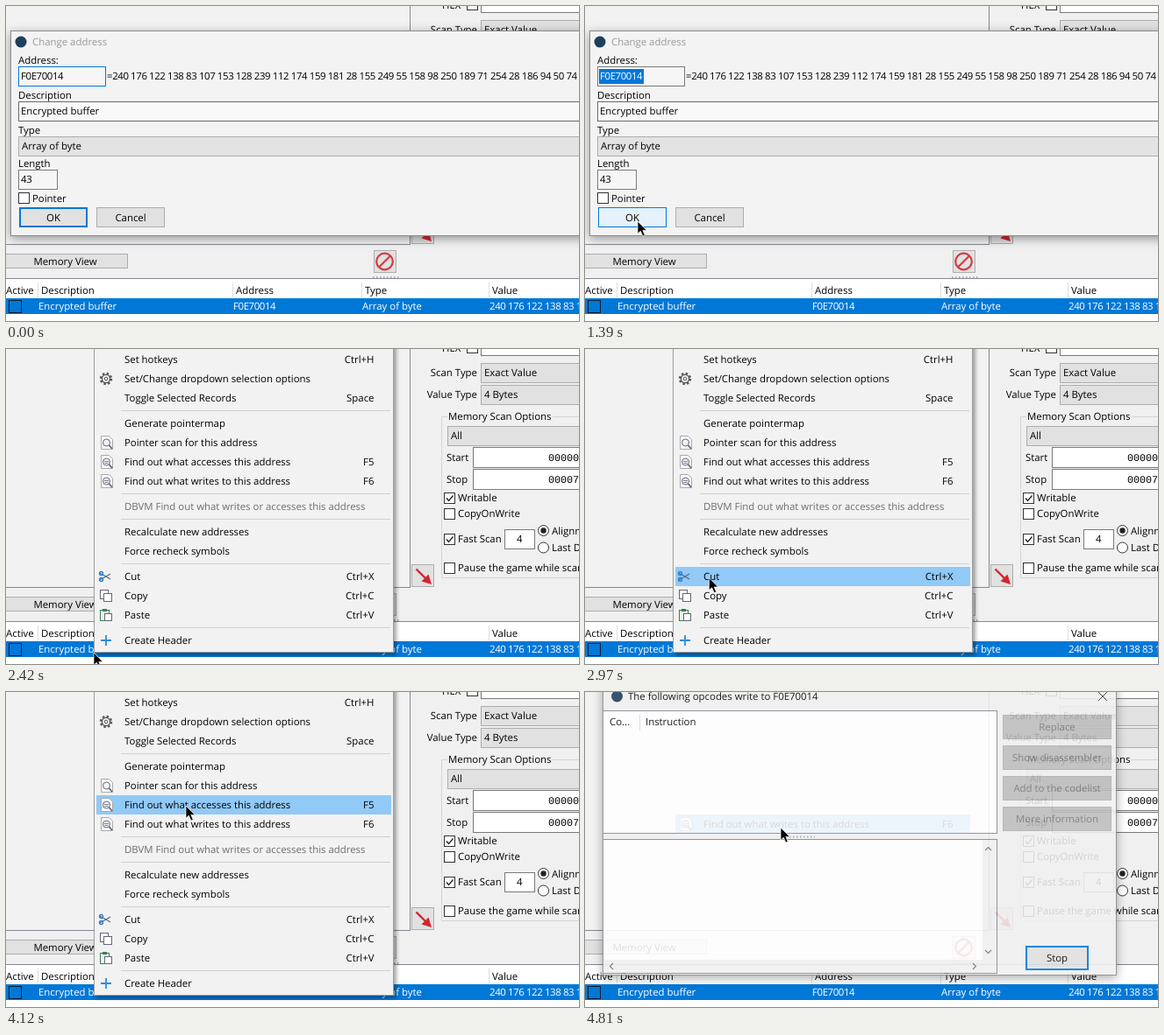
Animation, 653 px wide and 360 px high, one loop 4.89 s. Source, as an HTML page:

```html
<!DOCTYPE html>
<html lang="en">
<head>
<meta charset="utf-8">
<title>Change address</title>
<style>
html, body { margin: 0; width: 100%; height: 100%; overflow: hidden; background: #f0f0f0; }
svg { display: block; width: 653px; height: 360px; }
text { font: 11.4px "Open Sans", "Noto Sans", sans-serif; text-rendering: geometricPrecision; white-space: pre; }
.num { letter-spacing: -.38px; }
.mono { font: 11.7px "Liberation Mono", monospace; }
.shadow { filter: drop-shadow(0 3px 6px rgba(0, 0, 0, .38)); }
.soft { filter: drop-shadow(3px 3px 2px rgba(0, 0, 0, .35)); }
</style>
</head>
<body>
<svg id="stage" viewBox="0 0 653 360"></svg>
<script>
const LOOP = 4890, STEP = 75;
const BLUE = '#0078d7', FACE = '#e1e1e1', EDGE = '#adadad', FIELD = '#7a7a7a', HOT = '#91c9f7';
const stage = document.getElementById('stage');
const ui = {};
let layer = stage;

function add(tag, attrs) {
  const el = document.createElementNS('http://www.w3.org/2000/svg', tag);
  for (const k in attrs) el.setAttribute(k, attrs[k]);
  layer.appendChild(el);
  return el;
}

function group(build, attrs) {
  const parent = layer, g = add('g', attrs);
  layer = g;
  build();
  layer = parent;
  return g;
}

// Boxes with an outline sit on half pixels to stay crisp.
function box(x, y, w, h, fill, stroke, cls = '') {
  if (!stroke) return add('rect', { x, y, width: w, height: h, fill });
  return add('rect', { x: x + .5, y: y + .5, width: w - 1, height: h - 1, fill, stroke, class: cls });
}

// y is the middle of the capitals.
function label(s, x, y, { fill = '#000', anchor = 'start', cls = '' } = {}) {
  const el = add('text', { x, y: y + 4, fill, 'text-anchor': anchor, class: cls });
  el.textContent = s;
  return el;
}

const path = (d, stroke, width = 1, fill = 'none') =>
  add('path', { d, stroke, 'stroke-width': width, fill });
const disc = (cx, cy, r, fill, stroke = 'none', width = 1) =>
  add('circle', { cx, cy, r, fill, stroke, 'stroke-width': width });

function dots(x, y, w) {
  add('path', { d: `M${x} ${y}h${w}`, stroke: '#999', 'stroke-width': 1.5, 'stroke-dasharray': '1.5 2.5' });
}

function check(x, y, on) {
  box(x, y, 13, 13, '#fff', '#333');
  if (on) path(`M${x + 3} ${y + 6.5}l2.5 3l5 -6`, '#222', 1.3);
}

function radio(s, x, y, on) {
  disc(x, y, 6, '#fff', '#333');
  if (on) disc(x, y, 3.2, '#222');
  label(s, x + 9.5, y);
}

function button(s, x, y, w, h, { face = FACE, edge = EDGE, ink = '#000' } = {}) {
  const el = box(x, y, w, h, face, edge);
  label(s, x + w / 2, y + h / 2, { fill: ink, anchor: 'middle' });
  return el;
}

// Second outline of the default button.
const ring = (x, y, w, h) => box(x + 1, y + 1, w - 2, h - 2, 'none', BLUE);

function combo(s, x, y, face = FACE) {
  box(x, y - 11, 900, 23, face, EDGE);
  label(s, x + 4, y);
}

const bytes = '240 176 122 138 83 107 153 128 239 112 174 159 181 28 155 249 55 158 98 250 189 71 254 28 186 94 50 74 12';

// Main window
group(() => {
  box(0, 0, 653, 360, '#f0f0f0');
  box(-2, -2, 463, 275, '#f2f2f2', '#828790');

  label('HEX', 497, -1);
  check(525, -8);
  box(541, -16, 130, 24, '#fff', FIELD);
  ['Scan Type', 'Value Type'].forEach((s, i) => {
    label(s, 537, 27 + 25 * i, { anchor: 'end' });
    combo(['Exact Value', '4 Bytes'][i], 541, 27 + 25 * i);
  });
  path('M503 77.5H496.5V261.5H660M623 77.5H660', '#d5d5d5');
  label('Memory Scan Options', 504, 77);
  combo('All', 503, 99);
  ['Start', 'Stop'].forEach((s, i) => {
    const y = 124 + 25 * i;
    label(s, 502, y, { anchor: 'start' });
    box(532, y - 12, 150, 24, '#fff', FIELD);
    label(i ? '00007fff' : '00000000', 618, y, { cls: 'mono' });
  });
  [['Writable', 170, 1], ['CopyOnWrite', 188, 0], ['Fast Scan', 217, 1],
   ['Pause the game while scanning', 250, 0]].forEach(([s, y, on]) => {
    check(499, y - 6, on);
    label(s, 515, y);
  });
  box(568, 206, 35, 23, '#fff', FIELD);
  label('4', 582, 217);
  radio('Alignment', 612.5, 207.5, true);
  radio('Last Digits', 612.5, 227, false);

  box(462, 246, 26, 26, FACE, EDGE);
  path('M467.5 251.5L478 262', '#d3262f', 2.4);
  path('M485 269L481.5 257.5L473.5 265.5Z', 'none', 0, '#d3262f');
  box(419, 279, 26, 26, FACE, EDGE);
  disc(431.5, 292, 9.3, 'none', '#d63a42', 2.2);
  path('M425 298.5L438 285.5', '#d63a42', 2.2);
  button('Memory View', -4, 283, 143, 17);
  dots(418, 310, 30);

  box(-2, 311, 660, 60, '#fff', '#828790');
  box(0, 334, 653, 18, BLUE);
  box(3, 336, 15, 15, BLUE, '#0a1a2c');
  [['Active', 0, ''], ['Description', 40, 'Encrypted buffer'], ['Address', 262, 'F0E70014'],
   ['Type', 409, 'Array of byte'], ['Value', 554, bytes]].forEach(([head, x, cell]) => {
    path(`M${x - 3.5} 316V333`, '#ddd');
    label(head, x, 325);
    label(cell, x - 3, 343, { fill: '#fff', cls: /\d/.test(cell) ? 'num' : '' });
  });
});

// Address dialog
const dialog = group(() => {
  box(5, 28, 901, 235, '#f3f3f3', '#8a8a8a', 'shadow');
  disc(17, 41, 6.5, '#1d3f5c');
  label('Change address', 30, 41, { fill: '#999' });
  label('Address:', 14, 62);
  ui.addr = box(14, 69, 100, 23, '#f6f6f6', FIELD);
  ui.sel = box(16, 72, 51, 17, BLUE);
  ui.addrText = label('F0E70014', 17, 80, { cls: 'num' });
  label('=' + bytes, 115, 80, { cls: 'num' });
  label('Description', 14, 102);
  ui.desc = box(14, 109, 880, 23, '#f9f9f9', FIELD);
  label('Encrypted buffer', 17, 120);
  label('Type', 14, 142);
  combo('Array of byte', 14, 160.5 - .5, '#e3e3e3');
  label('Length', 14, 180);
  box(14, 187, 45, 23, '#f6f6f6', FIELD);
  label('43', 17, 198, { cls: 'num' });
  check(14, 213);
  label('Pointer', 30, 220);
  ui.ok = button('OK', 15, 230, 78, 23, { edge: BLUE });
  ui.okRing = ring(15, 230, 78, 23);
  button('Cancel', 103, 230, 78, 23);
}, { style: 'transform-origin:456px 130px' });

// Context menu
const icons = {
  gear(y) {
    add('circle', { cx: 114, cy: y, r: 6, fill: 'none', stroke: '#555', 'stroke-width': 2.4, 'stroke-dasharray': '2.4 2.3' });
    disc(114, y, 4.6, '#f2f2f2', '#555', 1.4);
    disc(114, y, 1.8, 'none', '#555');
  },
  find(y) {
    path(`M108.5 ${y - 7.5}h9l4 4v11h-13z`, '#aaa', 1, '#fafafa');
    disc(114.5, y, 4, '#eef3f7', '#667');
    path(`M117.5 ${y + 3}l3.5 4`, '#667', 1.8);
  },
  asm(y) {
    icons.find(y);
    path(`M112 ${y - .5}h5M112.5 ${y + 1.5}h4`, '#778', .9);
  },
  cut(y) {
    path(`M107 ${y + 4}L119 ${y - 3}M107 ${y - 4}L119 ${y + 3}`, '#5a6b7c', 1.3);
    [-3.5, 3.5].forEach(d => disc(108.5, y + d, 2, 'none', '#2b7fd0', 1.3));
  },
  copy(y) {
    box(107, y - 7, 10, 11, '#fff', '#667');
    box(111, y - 3, 10, 10, '#fff', '#667');
  },
  paste(y) {
    box(107, y - 6, 11, 13, '#e8f0ea', '#3f7d57');
    box(110, y - 7, 5, 3, '#3f7d57');
    box(112, y - 2, 9, 9, '#fff', '#667');
  },
  plus(y) { path(`M108 ${y}H120M114 ${y - 6}V${y + 6}`, '#2b8be0', 1.8); }
};

// Rows are 22 high; an empty entry is a 7 high separator.
const entries = [
  ['Set hotkeys', 'Ctrl+H'], ['Set/Change dropdown selection options', '', 'gear'],
  ['Toggle Selected Records', 'Space'], 0,
  ['Generate pointermap'], ['Pointer scan for this address', '', 'find'],
  ['Find out what accesses this address', 'F5', 'asm'],
  ['Find out what writes to this address', 'F6', 'asm'], 0,
  ['DBVM Find out what writes or accesses this address', '', '', 'off'], 0,
  ['Recalculate new addresses'], ['Force recheck symbols'], 0,
  ['Cut', 'Ctrl+X', 'cut'], ['Copy', 'Ctrl+C', 'copy'], ['Paste', 'Ctrl+V', 'paste'], 0,
  ['Create Header', '', 'plus']
];
const rows = [];

function row({ y, name, key, icon, off }) {
  label(name, 135, y, { fill: off ? '#6d6d6d' : '#000' });
  if (key) label(key, 419.5, y, { anchor: 'end' });
  if (icon) icons[icon](y);
}

const menu = group(() => {
  box(100, -21, 342, 368, '#f2f2f2', '#a0a0a0', 'soft');
  ui.hot = box(103, -11, 336, 22, HOT);
  let top = 1;
  entries.forEach(e => {
    if (!e) path(`M131 ${top + 3.5}H438`, '#d0d0d0');
    else {
      const [name, key, icon, off] = e;
      rows.push({ y: top + 11, name, key, icon, off });
    }
    top += e ? 22 : 7;
  });
  rows.forEach(row);
});

// Opcode window
const opcodes = group(() => {
  box(20, -11, 586, 335, '#f0f0f0', '#888', 'shadow');
  disc(36.5, 5, 6.5, '#1d3f5c');
  label('The following opcodes write to F0E70014', 49, 5);
  path('M585 0l10 10M595 0l-10 10', '#333');
  ui.late = group(() => {
    box(21, 21, 448, 141, '#fff');
    box(21, 168, 432, 138, '#fff');
    label('Co...', 28, 34);
    label('Instruction', 69, 34);
    path('M62.5 26V44', '#ddd');
    dots(229, 165.5, 33);
    ['Replace', 'Show disassembler', 'Add to the codelist', 'More information'].forEach((s, i) =>
      button(s, 476, 26 + 35 * i, 124, 28, { face: '#bdbdbd', edge: '#b2b2b2', ink: '#777' }));
    button('Stop', 502, 290, 72, 28, { edge: BLUE });
    ring(502, 290, 72, 28);
  });
  box(20, 21, 450, 141, 'none', '#828790');
  box(20, 168, 450, 154, 'none', '#828790');
  path('M456 181l3.5 -3.5l3.5 3.5M456 295l3.5 3.5l3.5 -3.5M32 310l-3.5 3.5l3.5 3.5M442 310l3.5 3.5l-3.5 3.5', '#777', 1.2);
}, { style: 'transform-origin:296px 117px' });

// The chosen menu row lingers while it fades.
const chosen = group(() => {
  const pick = rows.find(r => r.key === 'F6');
  box(103, pick.y - 11, 336, 22, HOT);
  row(pick);
});

const pointer = group(() => {
  ui.arrow = path('M0 0V14.2L3.3 11.2L5.9 17L8.3 16L5.8 10.4H10.3Z', '#fff', .7, '#000');
  ui.beam = path('M-2.5 -7.5H2.5M0 -7V7M-2.5 7.5H2.5', '#000');
});

// Rises from 0 to 1 in n equal steps, the first one at time a.
const ramp = (t, a, n) => Math.min(1, Math.max(0, (Math.floor((t - a) / STEP) + 1) / n));
const ease = p => p * p * (3 - 2 * p);

// Each leg glides from the last point: start time, steps, end point.
const legs = [[300, 5, 193, 49], [930, 7, 60, 246], [1480, 7, 100, 347], [2820, 7, 205, 130], [4200, 1, 223, 155]];

function pointerAt(t) {
  let x = 430, y = 282;
  for (const [a, n, tx, ty] of legs) {
    const p = ease(ramp(t, a, n));
    x += (tx - x) * p;
    y += (ty - y) * p;
  }
  return { x, y };
}

const set = (el, attrs) => { for (const k in attrs) el.setAttribute(k, attrs[k]); };
const scale = (el, s) => { el.style.transform = `scale(${s})`; };

function show(t) {
  const { x, y } = pointerAt(t);
  const inField = t >= 300 && t < 1480 && Math.abs(y - 120) < 12;
  set(pointer, { transform: `translate(${x} ${y})`, opacity: t < 300 ? 0 : 1 });
  set(ui.arrow, { opacity: inField ? 0 : 1 });
  set(ui.beam, { opacity: inField ? 1 : 0 });

  const picked = ramp(t, 70, 2), overOk = t >= 930 && y > 230;
  set(ui.sel, { opacity: picked });
  set(ui.addrText, { fill: picked ? '#fff' : '#000' });
  set(ui.addr, { stroke: picked < 1 ? BLUE : FIELD });
  set(ui.desc, { stroke: inField ? '#171717' : '#6a6a6a' });
  set(ui.ok, { fill: t >= 1480 ? '#cce4f7' : overOk ? '#e5f1fb' : FACE });
  set(ui.okRing, { opacity: overOk ? 0 : 1 });

  const closing = ramp(t, 1560, 3);
  set(dialog, { opacity: 1 - closing });
  scale(dialog, 1 - .05 * closing);

  const opening = ramp(t, 4580, 4);
  const hot = t >= 2820 && rows.find(r => !r.off && Math.abs(r.y - y) <= 11);
  set(menu, { opacity: opening ? 0 : ramp(t, 2270, 3) });
  set(ui.hot, { transform: `translate(0 ${hot ? hot.y : -40})` });

  set(chosen, { opacity: opening ? 1.14 - opening : 0 });
  set(opcodes, { opacity: .88 * ease(opening) });
  scale(opcodes, .94 + .06 * opening);
  set(ui.late, { opacity: opening > .6 ? 1 : 0 });
}

const start = performance.now();
function tick() {
  show((performance.now() - start) % LOOP);
  requestAnimationFrame(tick);
}
tick();
</script>
</body>
</html>
```
